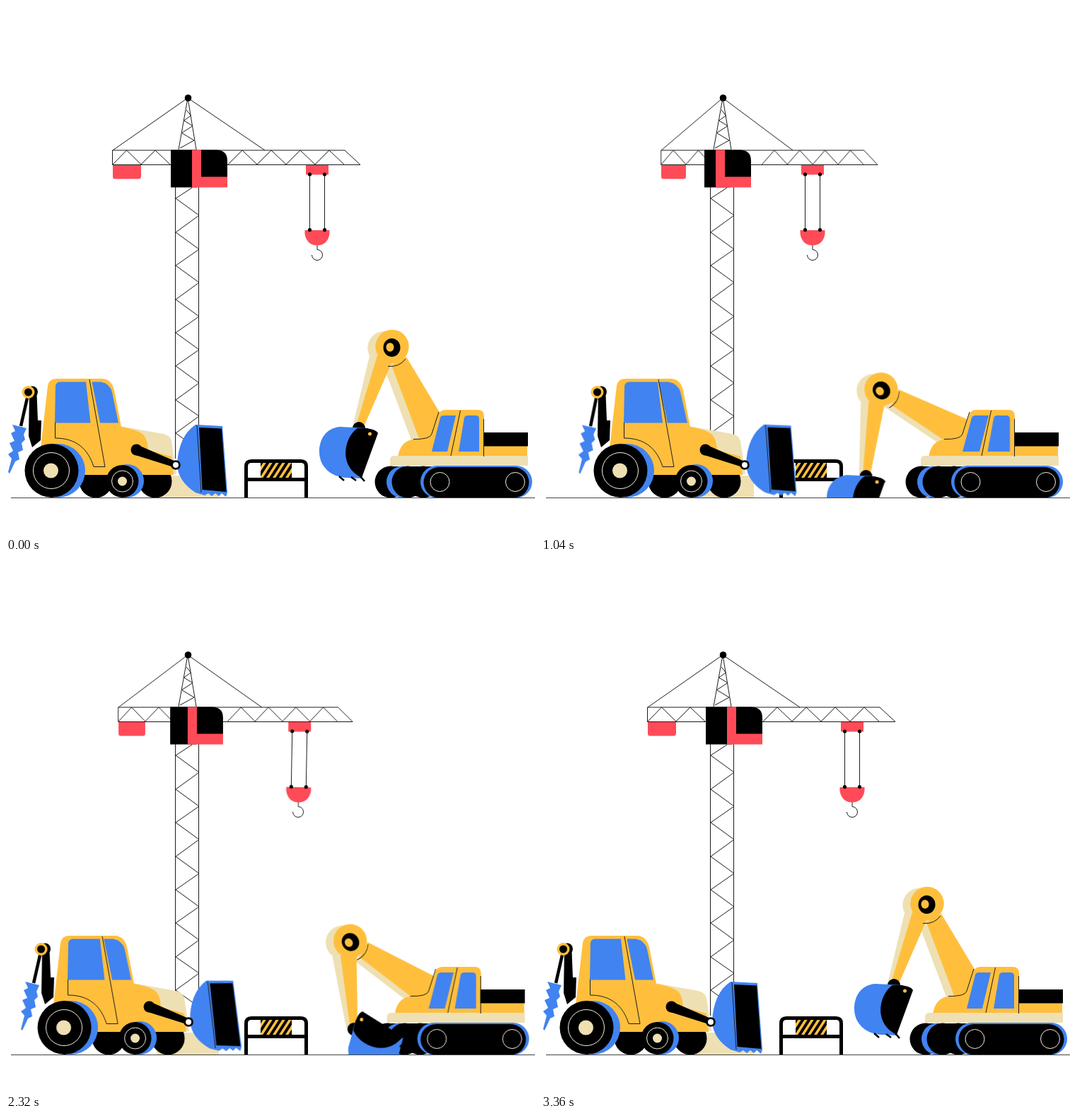
An HTML page without scripts that plays this animation: 748x748 px, repeating every 3.44 s.

```html
<!DOCTYPE html>
<html lang="en">
<head>
<meta charset="utf-8">
<title>Building site</title>
<style>
html, body { margin: 0; width: 100%; height: 100%; overflow: hidden; background: #fff; }
svg { display: block; width: 100vw; height: 100vh; }
.y { fill: #ffbf3d; }
.b { fill: #4183f0; }
.r { fill: #ff4b57; }
.c { fill: #eee0b3; }
.ln { fill: none; stroke: #1c1c1c; stroke-width: 1; }
.ring { fill: none; stroke: #f4efe0; stroke-width: 1; }
.jib, .guy-l, .guy-r { vector-effect: non-scaling-stroke; }

.jib, .weight, .guy-l, .guy-r, .cab-back, .cab, .trolley, .hook, .tractor, .drill,
.scoop, .digger, .pane, .boom, .stick, .bucket {
  animation: 3440ms linear infinite;
}
/* the crane turns: its width shrinks and grows again */
.jib, .weight { animation-name: jib; transform-origin: 302px 0; }
.guy-l { animation-name: guy-l; transform-origin: 257px 130px; }
.guy-r { animation-name: guy-r; transform-origin: 257px 130px; }
.cab-back { animation-name: cab-back; }
.cab { animation-name: cab; }
.trolley { animation-name: trolley; }
.jib, .weight, .guy-l, .guy-r, .cab-back, .cab, .trolley, .tractor, .drill, .digger, .pane {
  animation-timing-function: cubic-bezier(.37, 0, .63, 1);
}
@keyframes jib { 0%, 1%, 81%, to { transform: none } 19%, 51.2% { transform: scaleX(.874) } }
@keyframes guy-l { 0%, 1%, 81%, to { transform: none } 19%, 51.2% { transform: scaleX(.82) } }
@keyframes guy-r { 0%, 1%, 81%, to { transform: none } 19%, 51.2% { transform: scaleX(.908) } }
@keyframes cab-back { 0%, 1%, 81%, to { transform: none } 19%, 51.2% { transform: translateX(-2px) } }
@keyframes cab { 0%, 1%, 80%, to { transform: none } 19%, 50.5% { transform: translateX(-16px) } }
@keyframes trolley { 0%, 1%, 81%, to { transform: none } 19%, 51.8% { transform: translateX(-56px) } }

.hook { animation-name: hook; animation-timing-function: ease-in-out; transform-origin: 440px 238px; }
@keyframes hook {
  0%, 26%, 53%, 88%, to { transform: none }
  10% { transform: rotate(-1.2deg) }
  20% { transform: rotate(.5deg) }
  66% { transform: rotate(1.1deg) }
  79% { transform: rotate(-.5deg) }
}

.tractor { animation-name: tractor; }
@keyframes tractor {
  0%, 2%, 80.2%, to { transform: none }
  21%, 50% { transform: translateX(48px) }
}
.drill { animation-name: drill; transform-origin: 31px 546px; }
@keyframes drill {
  0%, 60%, to { transform: none }
  19%, 45% { transform: rotate(-1.2deg) }
}
.scoop { animation-name: scoop; animation-timing-function: ease-in-out; transform-origin: 240px 648px; }
@keyframes scoop {
  0%, 95%, to { transform: none }
  18.6% { transform: rotate(-2.6deg) }
  32%, 48% { transform: rotate(-.5deg) }
  58% { transform: rotate(-2deg) }
  67%, 79% { transform: rotate(-3deg) }
}

.digger { animation-name: digger; }
@keyframes digger {
  0%, 80.2%, to { transform: none }
  18.6%, 60.5% { transform: translateX(-6px) }
}
/* windows widen a little while a vehicle is turned */
.pane { animation-name: pane; transform-origin: var(--edge) 0; }
@keyframes pane {
  0%, 2%, 80.2%, to { transform: none }
  20%, 52% { transform: scaleX(1.09) }
}
.boom { animation-name: boom; transform-origin: 611px 604px; }
@keyframes boom {
  0% { transform: rotate(0deg); animation-timing-function: cubic-bezier(.5, 0, .8, .75) }
  18.6% { transform: rotate(-22.7deg); animation-timing-function: cubic-bezier(.2, .35, .6, 1) }
  34.9%, 41.9% { transform: rotate(-36.9deg); animation-timing-function: ease-in-out }
  58.1% { transform: rotate(-35.6deg); animation-timing-function: cubic-bezier(.5, .2, .8, .55) }
  67.4% { transform: rotate(-32deg); animation-timing-function: cubic-bezier(.35, .18, .7, .76) }
  79.1% { transform: rotate(-10.2deg); animation-timing-function: cubic-bezier(.2, .4, .5, 1) }
  93%, to { transform: rotate(0deg) }
}
.stick { animation-name: stick; transform-origin: 545px 482px; }
@keyframes stick {
  0% { transform: rotate(0deg); animation-timing-function: cubic-bezier(.5, 0, .8, .75) }
  18.6% { transform: rotate(17.6deg); animation-timing-function: cubic-bezier(.2, .4, .6, 1) }
  34.9% { transform: rotate(24deg); animation-timing-function: ease-in }
  41.9% { transform: rotate(21.5deg) }
  58.1% { transform: rotate(10.5deg) }
  67.4% { transform: rotate(7.6deg) }
  79.1% { transform: rotate(.4deg); animation-timing-function: ease-out }
  93%, to { transform: rotate(0deg) }
}
.bucket { animation-name: bucket; transform-origin: 499px 597px; }
@keyframes bucket {
  0% { transform: rotate(0deg); animation-timing-function: ease-in-out }
  18.6% { transform: rotate(22.1deg); animation-timing-function: ease-in }
  30.2% { transform: rotate(12deg) }
  41.9% { transform: rotate(-15.6deg); animation-timing-function: cubic-bezier(.3, .4, .6, 1) }
  58.1% { transform: rotate(-57deg); animation-timing-function: ease-in-out }
  67.4% { transform: rotate(-53.6deg); animation-timing-function: ease-in }
  79.1% { transform: rotate(-40.2deg); animation-timing-function: cubic-bezier(.3, .4, .5, 1) }
  95.3%, to { transform: rotate(0deg) }
}
</style>
</head>
<body>
<svg viewBox="0 0 748 748">
  <defs>
    <clipPath id="above"><path d="M0 0H748V695.5H0Z"/></clipPath>
    <clipPath id="panel"><path d="M360 646H404V668H360Z"/></clipPath>
    <g id="beam">
      <path d="M566 496L620 586L612 622L588 622L545 508Z"/>
      <circle cx="546" cy="481.500" r="23.700"/>
    </g>
  </defs>

  <!-- crane -->
  <path class="c" d="M213 664H296Q301 664 301 670V695H213Z"/>
  <g class="ln">
    <path d="M239.500 256V640M272.500 256V640"/>
    <path d="M263 257L240 272L273 296L240 320L273 344L240 367L273 391L240 415L273 439L240 462L273 486L240 509L273 533L240 557L273 580L240 604L273 628"/>
    <path d="M244 203L257 130L269 203M255 147L261.500 155L251.500 162L264 169.500L248.500 179.500L266 190L246 201"/>
    <path class="guy-l" d="M257 130L151 204"/>
    <path class="guy-r" d="M257 130L366 204"/>
    <path class="jib" d="M501 224.500H150.500V204H479L501 224.500M151 224L170.500 204L191 224L211 204L232 224M314 224L334 204L355 224L375 204L396 224L416 204L437 224L457 204L478 224"/>
  </g>
  <circle cx="257.500" cy="130" r="4.800"/>
  <path class="r weight" d="M151 225H191V241Q191 244.500 187 244.500H154Q151 244.500 151 241Z"/>
  <path class="cab-back" d="M233 203.500H270V256.500H233Z"/>
  <g class="cab">
    <path class="r" d="M263 203.500H276.500V241H313V256.500H263Z"/>
    <path d="M276 203.500H297Q313 203.500 313 219V241.500H276Z"/>
  </g>
  <g class="trolley">
    <path class="r" d="M424 225H456V238.500H424Z"/>
    <g class="hook">
      <path class="ln" d="M429.500 238V316M450.500 238V316M440 338V344.500A7.500 7.500 0 1 1 432.500 352"/>
      <path class="r" d="M422.500 317H457.500V322C456 333 449 338.500 440 338.500S424 333 422.500 322Z"/>
      <path d="M429.500 238h.01M450.500 238h.01M429.500 316.500h.01M450.500 316.500h.01" stroke="#000" stroke-width="5.200" stroke-linecap="round"/>
    </g>
  </g>

  <!-- barrier -->
  <path class="y" d="M360 646H404V668H360Z"/>
  <path clip-path="url(#panel)" d="M345 671l18-28m-9 28l18-28m-9 28l18-28m-9 28l18-28m-9 28l18-28m-9 28l18-28m-9 28l18-28" stroke="#000" stroke-width="4"/>
  <path d="M339.500 695V651Q339.500 643.500 347 643.500H417Q424.500 643.500 424.500 651V695M339.500 669.500H424.500" fill="none" stroke="#000" stroke-width="5"/>

  <!-- tractor -->
  <g class="tractor">
    <path class="c" d="M150 592L222 605Q232 607 234 615L241 662H190Z"/>
    <path d="M33 549L43.500 549L45 586H50L49 614L37 624L32 608Z"/>
    <circle cx="37" cy="545.500" r="8"/>
    <g class="drill">
      <path d="M31 550L21 594" stroke="#000" stroke-width="4.500"/>
      <path class="b" d="M9 592L29 597L25 606L27 613L22 618L24 628L17 631L19 641L13 644L5 661L3 659L8 640L3 634L10 629L5 618L12 615L7 604L13 601Z"/>
    </g>
    <circle class="y" cx="31.500" cy="546" r="9"/>
    <circle cx="31.500" cy="546" r="5.500"/>
    <circle cx="127" cy="672" r="23.500"/>
    <circle cx="211" cy="672" r="23.500"/>
    <path class="y" d="M49 625L59 537Q61 527 71 527H137Q149 528 153 543L163 595Q186 599 194 606Q200 612 201 628L234 637L237 663H60Z"/>
    <path class="b pane" style="--edge: 69px" d="M70 537Q71 531.500 77 531.500H113L119.500 589.500H69Z"/>
    <path class="b pane" style="--edge: 159px" d="M121.500 531.500H134Q147 534 150 546L159 589.500H133Z"/>
    <path class="ln" d="M69.500 589V611C99 611 116 626 124 651.500H140L118 528"/>
    <circle class="b" cx="74" cy="657" r="38"/>
    <circle cx="64.500" cy="657" r="38"/>
    <circle class="ring" cx="64" cy="657" r="25.500"/>
    <circle class="c" cx="63.500" cy="657" r="10.500"/>
    <circle class="b" cx="171.500" cy="671.500" r="23.500"/>
    <circle cx="164.500" cy="672" r="23"/>
    <circle class="ring" cx="164.500" cy="672" r="15"/>
    <circle class="c" cx="164.500" cy="672" r="6.500"/>
    <g class="scoop">
      <path class="b" d="M268 592L306 594L313 688L311 694L305 689L301 693L296 689L291 693L286 689L281 692L268 688Q243 672 242 648Q244 608 268 592Z"/>
      <path d="M273 596L305 597.500L311.500 687L277.500 684Z"/>
      <path class="ln" d="M270 593L276 688"/>
    </g>
    <path d="M187 621L240 644V653L183 635Z"/>
    <circle cx="184.500" cy="627.500" r="8"/>
    <circle cx="240" cy="649" r="6.800"/>
    <circle cx="240" cy="649" r="4" fill="#fff"/>
  </g>

  <!-- excavator -->
  <g clip-path="url(#above)">
    <g class="digger">
      <circle cx="544" cy="673" r="22.500"/>
      <path d="M544 651H610V690H580Z"/>
      <circle class="b" cx="560.500" cy="673" r="22.500"/>
      <circle cx="568" cy="673" r="22.500"/>
      <circle cx="590" cy="673" r="22.500"/>
      <g class="c" transform="translate(-11 2)">
        <g class="boom">
          <use href="#beam"/>
          <path class="stick" d="M525 493L547 503L511 597L501 593Z"/>
        </g>
      </g>
      <g class="boom">
        <g class="stick">
          <path class="y" d="M525 494L546 503L505.500 596L495.500 592Z"/>
          <g class="bucket">
            <circle cx="499" cy="597" r="9"/>
            <path class="b" d="M512 597L472 595C452 597 443 613 443 630C443 652 460 666 482 667L503 668Z"/>
            <path d="M497 597C484 606 478 625 481 640C483 652 492 662 503 667L526 604Q524 599 510 597Z"/>
            <path d="M471 665L478 671M488 666L495 671M501 665L507 672" stroke="#000" stroke-width="2.500"/>
            <circle class="y" cx="514.500" cy="605" r="2.500"/>
          </g>
        </g>
        <use class="y" href="#beam"/>
        <path class="ln" d="M540 509.500Q556 511 565 499"/>
        <ellipse cx="545.500" cy="483" rx="12" ry="13"/>
        <ellipse class="y" cx="543" cy="482.500" rx="5.500" ry="6.200"/>
      </g>
      <path class="y" d="M554 640Q556 614 580 612H600L611 579Q613 571 622 571H667Q676 571 676 580V622H737V640Z"/>
      <path d="M675 603H738V622.500H675Z"/>
      <path class="c" d="M549 636H738V650H543V642Q543 636 549 636Z"/>
      <path class="b pane" style="--edge: 602px" d="M614 582Q615 579 619 579H636L624 630H602Z"/>
      <path class="b pane" style="--edge: 669px" d="M648 582Q649 579 653 579H664Q669 579 669 584V630H640Z"/>
      <path class="ln" d="M576 612.500Q600 613 602 605L612 574M642.500 572L629 636M675.500 584V637"/>
      <rect class="b" x="586" y="650" width="158" height="45.500" rx="22.700"/>
      <rect x="590.500" y="652" width="149" height="43.500" rx="21.700"/>
      <circle class="ring" cx="613.500" cy="673" r="13.500"/>
      <circle class="ring" cx="720" cy="673" r="13.500"/>
    </g>
  </g>
  <path d="M7 695.500H748" stroke="#444" stroke-width="1.200"/>
</svg>
</body>
</html>
```
